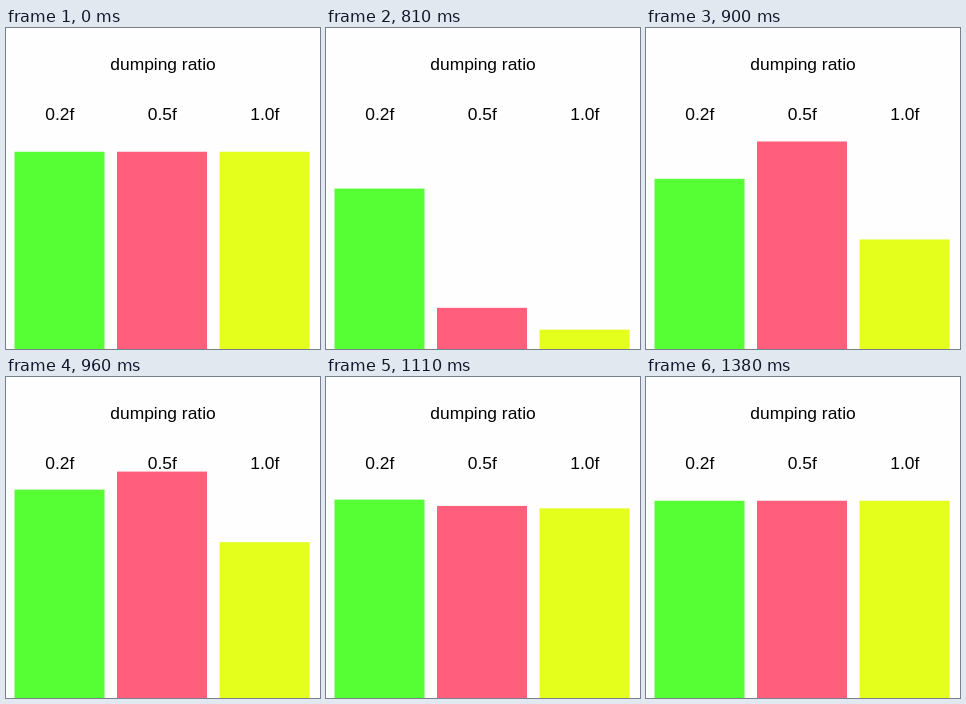
Write an HTML page that moves like this. It is 314 px wide and 321 px high and loops after 2790 ms.

```html
<!DOCTYPE html>
<html>
<head>
<meta charset="utf-8">
<style>
  html, body { margin: 0; height: 100%; overflow: hidden; background: #fefefe; }
  svg { display: block; }
  text { font: 17.4px "Liberation Sans", Arial, sans-serif; text-anchor: middle; }
</style>
</head>
<body>
<svg width="314" height="321">
  <rect x="8.5" width="90" fill="#55ff33"/>
  <rect x="111" width="90" fill="#ff5f7c"/>
  <rect x="213.5" width="90" fill="#e3ff1b"/>
  <text x="157" y="42">dumping ratio</text>
  <text x="53.8" y="92">0.2f</text>
  <text x="156.3" y="92">0.5f</text>
  <text x="258.8" y="92">1.0f</text>
</svg>
<script>
const LOOP = 2790, START = 780, END = 1380, STEP = 30;
const BOTTOM = 321.5, REST = 197.75;
const bars = document.querySelectorAll('rect');

// Damping ratio and angular speed (radians per tick) of each bar
const springs = [[0.2, 0.776], [0.5, 0.373], [0.9999, 0.2665]];

// The first steps advance by an uneven number of spring ticks
const firstTicks = [0, 2, 4, 6, 7, 9, 11];
const ticksAt = step => firstTicks[step] ?? 11 + (step - 6) * 1.6;

function spring(ratio, angle) {
  const k = Math.sqrt(1 - ratio * ratio);
  return 1 - Math.exp(-ratio * angle) *
    (Math.cos(k * angle) + ratio / k * Math.sin(k * angle));
}

function draw(now) {
  const t = now % LOOP;
  const moving = t >= START && t < END;
  const ticks = ticksAt(Math.floor((t - START) / STEP));
  springs.forEach(([ratio, speed], i) => {
    const height = REST * (moving ? spring(ratio, speed * ticks) : 1);
    bars[i].setAttribute('y', BOTTOM - height);
    bars[i].setAttribute('height', Math.max(0, height));
  });
  requestAnimationFrame(draw);
}

const begin = performance.now();
const frame = draw;
draw = now => frame(Math.max(0, now - begin));
draw(begin);
</script>
</body>
</html>
```
